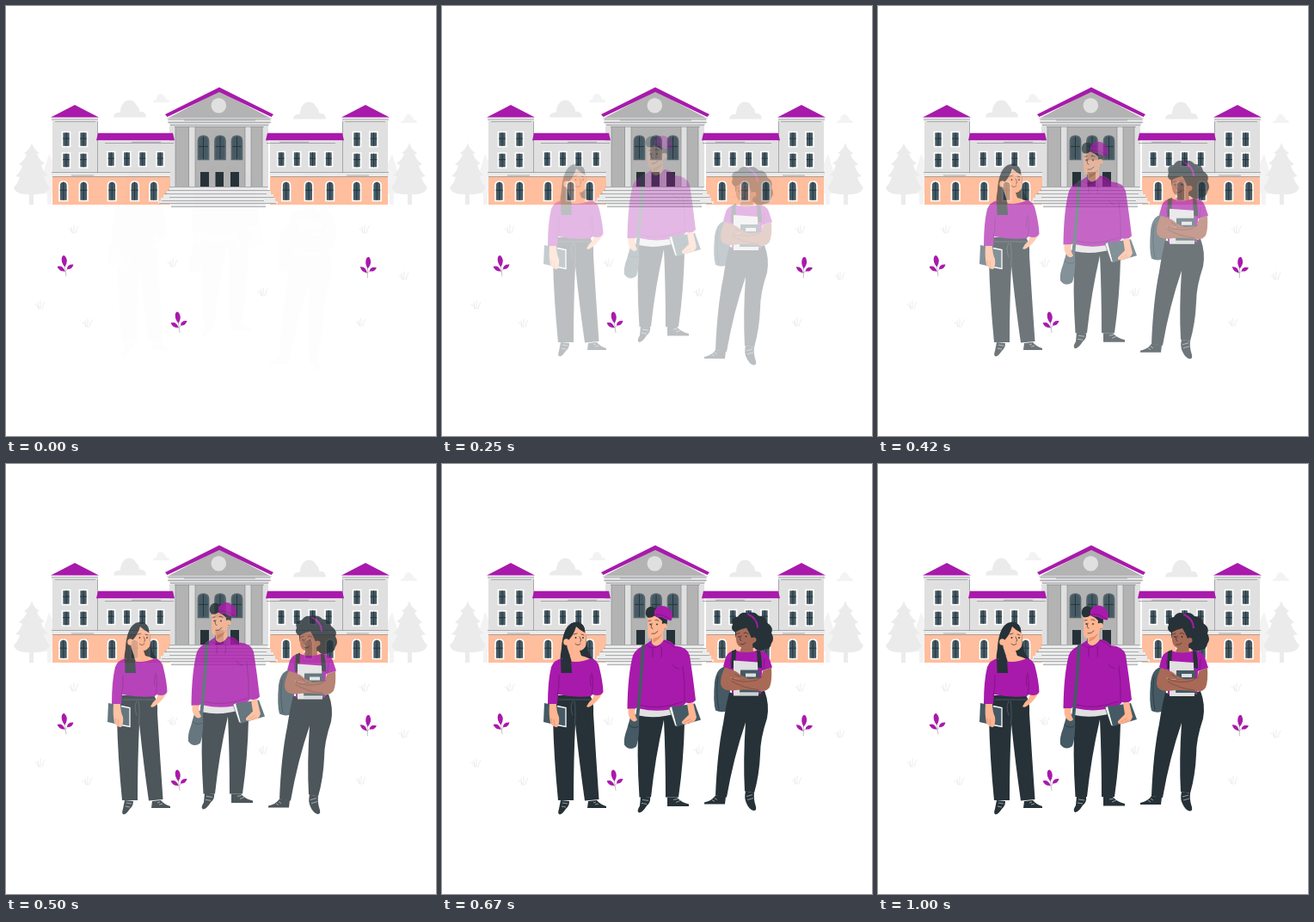
An HTML page for the animation above (1040 ms loop, 500 by 500 pixels).

```html
<!DOCTYPE html>
<html lang="en">
<head>
<meta charset="utf-8">
<title>Students in front of a college</title>
<style>
html, body { margin: 0; width: 100%; height: 100%; overflow: hidden; background: #fff; }
svg { display: block; width: 100%; height: 100%; }
.p { fill: #a81aab; }
.d { fill: #263238; }
.s { fill: #455a64; }
.w { fill: #fff; }
.k { fill: #ffb592; }
.b { fill: #a86a57; }
.g { fill: #e0e0e0; }
.m { fill: #b3b3b3; }
.e { fill: #ebebeb; }
.f { fill: #f3f3f3; }
.l { fill: none; stroke: #263238; stroke-width: .7; stroke-linecap: round; }
.q { fill: none; stroke: #6b1070; stroke-width: .6; stroke-linecap: round; }
.h { fill: none; stroke: #8b8f92; stroke-width: .7; }
.t { fill: none; stroke: #fff; stroke-width: .5; }
</style>
</head>
<body>
<svg viewBox="0 0 500 500">
  <defs>
    <g id="plant">
      <path class="l" d="M-1 0Q0 7 1 13M0 7Q3 5 5 3M0 8Q-3 6 -5 4" style="stroke:#888;stroke-width:.5"/>
      <path class="p" d="M-.5 2.500Q-5.500 -3 -4 -9Q-2 -13 .5 -9Q3.500 -4 -.5 2.500ZM-.5 7.500Q-7 8 -9.500 2Q-3 0 -.5 7.500ZM2 5Q2 -1 9.500 -.5Q8 5.500 2 5Z"/>
    </g>
    <path id="tuft" class="l" style="stroke:#e4e4e4" d="M-1 4Q-3 0 -6 -1M0 4V-5M2 4Q3 -1 5 -4M-2 4L-3 -3"/>
    <path id="cloud" d="M0 20Q0 14 8 14Q8 8 11 4Q14 0 18 0Q24 0 26 5Q30 8 30 13Q38 13 38 20Z"/>
    <g id="back">
      <path class="f" d="M50 172L60 195H57L66 218H53V231H48V218H36Z"/>
      <path class="e" d="M30 159Q32 167 39 171L36 172Q39 180 45 183L41 185Q43 193 49 197L44 198Q46 206 51 211Q47 220 32 219V231H27V219Q12 220 9 211Q14 206 16 199L11 198Q17 193 19 186L15 184Q21 180 24 173L21 171Q28 167 30 159Z"/>
    </g>
    <g id="side">
      <path class="g" d="M54 130H107V157H191V196H54Z"/>
      <path fill="#ffbe9d" d="M54 198H191V231H54Z"/>
      <path class="e" d="M53 194H191V198H53Z"/>
      <path class="h" d="M53 193.500H191M76 197H102M54 198.500H190M106.500 133V194M115 159.500H195M146 158.300H180"/>
      <path class="e" d="M53 130H107V134H53Z"/>
      <path class="h" d="M53 132H107M57 134.500H104"/>
      <path class="p" d="M80 115L108 129.500H52ZM107 147.800H194L196 156.300H105Z"/>
    </g>
  </defs>

  <use href="#cloud" class="e" x="125" y="109.500"/>
  <use href="#cloud" class="e" x="334" y="111.500"/>
  <use href="#cloud" class="f" transform="translate(171 102)scale(.5)"/>
  <use href="#cloud" class="f" transform="translate(459 126)scale(.5)"/>
  <use href="#back"/>
  <use href="#back" transform="translate(499)scale(-1 1)"/>

  <path class="m" d="M191 138H305V211H191Z"/>
  <path class="g" d="M190 140H197V210H190ZM213 140H220V210H213ZM278 140H285V210H278ZM298 140H305V210H298Z"/>
  <path class="h" d="M197 140V210M212.500 140V210M220 140V210M278 140V210M285 140V210M298 140V210"/>
  <path class="m" d="M248 99L309 131H187Z"/>
  <path class="g" d="M187 130H309L305 140H191Z"/>
  <path class="h" d="M189 131.500H307M207 133H290M188 135.500H308M191 138.500H305M196 140.500H300"/>
  <path class="p" d="M248 94.500L311 126L308.500 129L248 100L187.500 129L185 126Z"/>
  <circle class="g" cx="247.300" cy="115.800" r="8.800"/>
  <use href="#side"/>
  <use href="#side" transform="translate(498)scale(-1 1)"/>
  <path class="e" d="M190 210H304V215H308V219H311V223H313V227H316V230H302V234H192V230H177V227H180V223H183V219H187V215H190Z"/>
  <path class="h" d="M190 210.500H304M188 214.500H307M184 218.500H303M190 222.500H311M181 226.500H300M178 229.500H314M192 233.500H302"/>
  <path class="d" d="M226 193H236V210H226ZM243.500 193H253V210H243.500ZM261 193H271V210H261Z"/>
  <g id="windows"></g>

  <g id="tufts"></g>
  <use href="#plant" x="69" y="301"/>
  <use href="#plant" x="201" y="366.500"/>
  <use href="#plant" transform="translate(421.500 303)rotate(10)"/>

  <g id="left">
    <path class="d" d="M155 183.500C167 183 167 197 168.500 209Q169 221 176.500 227L150 228Z"/>
    <path class="k" d="M148 190Q160 184 166 193Q169 204 167 212Q164 217 160 217L162 223Q170 225 174 228Q160 240 139 229L149 223L143 206Z"/>
    <path class="d" d="M154 184C143 186 140 201 139 214Q136 230 138.500 243H151Q152 232 149 224Q145 215 145 207Q153 200 156 189Q160 193 166 196Q167 184 154 184Z"/>
    <ellipse class="k" cx="144.500" cy="207" rx="3.300" ry="3.700"/>
    <path class="l" d="M153 198L157 197M162 198L165 199M160 201Q163 206 160.500 207M155 209Q158 212 161 209"/>
    <circle class="d" cx="155.500" cy="202" r=".9"/><circle class="d" cx="164" cy="202" r=".9"/>
    <path class="d" d="M134 269H172Q177 276 176 290Q179 340 182.500 390L166 391.500Q160 350 155 302Q153 345 153 391H135Q130 340 129 296Q130 280 134 269Z"/>
    <path class="l" style="stroke:#56636a" d="M136 274H174M154 276Q156 286 154.500 302M152 276Q148 282 152 292"/>
    <path class="k" d="M178 265L187 266Q181 276 175 280Q171 284 168 282Q171 276 175 273Z"/>
    <path class="p" d="M139 226Q155 234 173 226Q181 227 183 237Q187 253 187.500 265Q184 271 175 268L173 270Q155 272 135 268L134 279Q128 282 123 279Q123 252 127 236Q130 228 139 226Z"/>
    <path class="d" d="M138 227H150L151 243H138.500Z"/>
    <path class="q" d="M136 246Q137 258 134 270M174 243Q177 255 174 268M173 246Q172 252 173 258"/>
    <path class="s" d="M119 278L144 283V306L118 300Z"/>
    <path class="t" style="stroke-width:1.300" d="M134 281.500L144 283.500V305.500L134 303.500"/>
    <path class="k" d="M125 279H133Q133 288 136 294Q137 302 134 306Q129 306 126 301Q124 291 125 279Z"/>
    <path class="l" style="stroke:#c87955;stroke-width:.5" d="M128 302L127 296M131 304L130 297"/>
    <path class="d" d="M138 391L148 392Q148 398 144 401Q140 407 137 407.500Q134 407 136 401ZM170 392L180 391Q184 396 191 398V400H169Z"/>
    <path class="t" d="M140 394L146 395M139 398L144 399M176 394L179 393M178 396L182 395"/>
  </g>

  <g id="middle">
    <path class="k" d="M239 177Q248 170 258 177L261 188Q259 193 257 194V213H244V203Q239 203 239 196Z"/>
    <path fill="#e8936e" d="M246 202Q253 201 256 196Q254 204 245 207Z"/>
    <path class="d" d="M239 178Q235 174 238 168Q242 163 248 167Q257 170 262 180Q262 188 259 192Q255 187 256 182Q252 178 247 176Q243 179 239 178Z"/>
    <path class="p" d="M247 170Q254 161 263 167Q270 172 267 181Q261 182 256 178Q251 178 247 176Z"/>
    <path class="q" d="M248 175Q257 173 266 181"/>
    <circle class="k" cx="258.500" cy="188" r="3.200"/>
    <path class="l" d="M240 182L243 181.500M248 181Q250 180 252 182M244 185Q242 191 245 191M244 197Q248 198 251 194"/>
    <circle class="d" cx="242.300" cy="186" r=".9"/><circle class="d" cx="250" cy="186" r=".9"/>
    <path class="g" d="M229 282H270V294H229Z"/>
    <path class="d" d="M229 292Q250 297 278 288L282 301Q281 345 275 387H260Q260 340 258 297Q248 340 243 387H229.500Q226 335 229 292Z"/>
    <path class="p" d="M234 211L243 205Q244 211 250 211Q256 209 258 204Q266 204 271 211Q285 212 288 222Q292 248 295 274Q291 279 284 277L280 281Q254 290 230 284L228 282Q222 287 215.500 284Q216 244 222 222Q225 215 234 211Z"/>
    <path class="q" d="M238 210Q248 219 258 205Q266 208 271 213M245 214V224M255 212Q256 218 255 224M280 235Q283 255 282 276M230 280Q253 286 280 276M268 233Q271 237 275 238"/>
    <path class="s" d="M232 211L236 208Q233 255 229 296L225 296Q230 250 231 225Z"/>
    <path class="s" d="M219 294Q224 286 229 295Q230 317 226 328Q218 334 212 326Q211 318 215 308Z"/>
    <path class="l" d="M217 303Q222 308 228 305"/>
    <path class="k" d="M217 284H225Q223 290 227 297Q224 301 220 297Q215 291 217 284Z"/>
    <path class="w" d="M264 283L268 281L274 305L271 304Z" stroke="#263238" stroke-width=".6"/>
    <path class="s" d="M267 282L294 278L301 297L273 305Z"/>
    <path class="k" d="M285 278L292 277Q294 286 296 294Q294 301 287 301Q278 304 279 299L287 291Z"/>
    <path class="l" style="stroke:#c87955;stroke-width:.5" d="M282 300L289 296M286 301L291 298"/>
    <path class="d" d="M231 386L242 387Q243 393 238 397Q233 405 229 405Q226 403 230 397ZM262 387H273Q278 393 287 395V397.500H262Z"/>
    <path class="t" d="M233 390L240 391M232 394L238 395M269 390L274 389M272 393L277 391"/>
  </g>

  <g id="right">
    <path class="s" d="M329 236Q319 238 317 254Q315 277 318 287Q326 291 334 286L336 238Z"/>
    <path class="l" d="M321 247Q318 266 322 286"/>
    <path class="d" d="M338 187Q335 179 344 178Q348 171 356 174Q363 171 368 177Q377 177 378 185Q386 190 383 197Q387 204 383 209Q382 216 375 216Q369 221 363 214Q357 216 350 211Q340 206 341 196Q335 193 338 187Z"/>
    <path class="b" d="M342 195Q348 191 351 187Q360 192 364 198Q365 207 361 210L362 219Q353 225 346 218L348 214Q342 211 342 204Z"/>
    <path class="d" d="M341 196Q337 188 344 184Q355 180 362 189Q367 194 365 207L360 203Q357 196 354 191Q348 192 341 196Z"/>
    <path d="M355 174.500Q367 180 367 191" fill="none" stroke="#a81aab" stroke-width="2"/>
    <circle class="b" cx="362.500" cy="205" r="3"/>
    <path class="l" d="M343 198L346 197M351 197Q354 195 356 198M348 200Q345 205 348 206M347 210Q351 211 353 208"/>
    <circle class="d" cx="345.300" cy="201" r=".9"/><circle class="d" cx="353.500" cy="201" r=".9"/>
    <path class="d" d="M334 266Q355 271 375 264Q381 280 378 296Q370 320 370 338Q369 362 363 383L352 381Q350 345 353 301Q339 342 331 388L318 386Q320 336 327 302Q330 282 334 266Z"/>
    <path class="p" d="M341 217Q354 222 367 217Q377 217 380 225L384 237L372 241L371 268H337V240L327 236L330 225Q333 218 341 217Z"/>
    <path class="d" d="M337 218L342 216L341 238H336ZM366 217L370 218Q372 226 372 238L367 237Z"/>
    <path class="g" d="M339 229L367 231L368 270H339Z"/>
    <path class="s" d="M347 240H369V268H346Z"/>
    <path class="g" d="M353 244H365V248H353ZM346 266H368V268H346Z"/>
    <path class="b" d="M329 237L338 240Q333 248 337 250Q354 252 371 249L373 241L383 237Q384 253 381 260Q377 266 367 264Q350 262 337 264Q325 264 324 256Q324 246 329 237Z"/>
    <path class="b" d="M337 250Q331 242 335 240Q342 240 347 246L358 251Z"/>
    <path class="l" style="stroke:#6d3e34;stroke-width:.6" d="M337 250Q350 256 365 252L372 248M341 245L347 248M337 253Q350 261 368 263"/>
    <path class="q" d="M375 227L374 239M335 228L337 238"/>
    <path class="d" d="M318 386L330 387L329 396H305V394Q314 392 318 386ZM353 381L363 383Q362 390 365 399Q366 404 362 403.500Q357 402 354 395Q351 389 353 381Z"/>
    <path class="t" d="M317 389L320 391M314 391L317 393M354 387L361 385M355 391L362 389"/>
  </g>
</svg>
<script>
const el = id => document.getElementById(id);

// One window: h is the height, a the height of the arched top
function pane(x, y, w, h, a, frame) {
  const c = x + w / 2;
  const top = a ? `V${y + a}Q${x} ${y} ${c} ${y}Q${x + w} ${y} ${x + w} ${y + a}` : `V${y}H${x + w}`;
  return `<path class="s" stroke="${frame}" stroke-width="1.700" d="M${x} ${y + h}${top}V${y + h}Z"/>` +
    `<path class="l" style="stroke-width:.9" d="M${c} ${y + 1}V${y + h - 1}M${x + 1} ${y + h * .45}H${x + w - 1}"/>`;
}
const row = (xs, ...size) => xs.map(x => pane(x, ...size)).join('');

const tower = [65.500, 85.500, 403.500, 423];
el('windows').innerHTML =
  row(tower, 146.500, 9, 17, 0, '#fff') +
  row(tower, 171, 9, 17, 0, '#fff') +
  row([118, 136.300, 154.500, 175, 315.800, 334, 352.300, 371], 169.500, 8.500, 17, 0, '#fff') +
  row([62, 85.500, 118.500, 144.800, 167, 321, 347.300, 372, 403, 426.500], 204, 9.500, 22.500, 5, '#fff') +
  row([223.500, 243, 262.500], 151, 12, 27.500, 6, '#59666d');

el('tufts').innerHTML =
  [[79, 260], [194, 299], [40, 348], [95, 369], [417, 260], [463, 314], [299, 333], [413, 368]]
    .map(([x, y]) => `<use href="#tuft" x="${x}" y="${y}"/>`).join('');

// cubic-bezier(.36, -.01, .5, 1.38), solved by bisection
function ease(x) {
  if (x >= 1) return 1;
  const curve = (t, a, b) => 3 * (1 - t) ** 2 * t * a + 3 * (1 - t) * t * t * b + t ** 3;
  let lo = 0, hi = 1;
  for (let i = 0; i < 30; i++) {
    const mid = (lo + hi) / 2;
    if (curve(mid, .36, .5) < x) lo = mid; else hi = mid;
  }
  return curve(lo, -.01, 1.38);
}

const LOOP = 1040, STEPS = 25, RISE = 20;
const people = { left: 0, middle: -RISE, right: RISE };

function draw() {
  const time = performance.now() % LOOP;
  const step = Math.min(STEPS - 1, Math.floor((time + 4) * STEPS / LOOP));
  const k = ease((step + 1) / 24);
  for (const [id, shift] of Object.entries(people)) {
    el(id).setAttribute('opacity', Math.max(0, Math.min(1, k)));
    el(id).setAttribute('transform', `translate(0 ${shift * (1 - k)})`);
  }
  requestAnimationFrame(draw);
}
draw();
</script>
</body>
</html>
```
